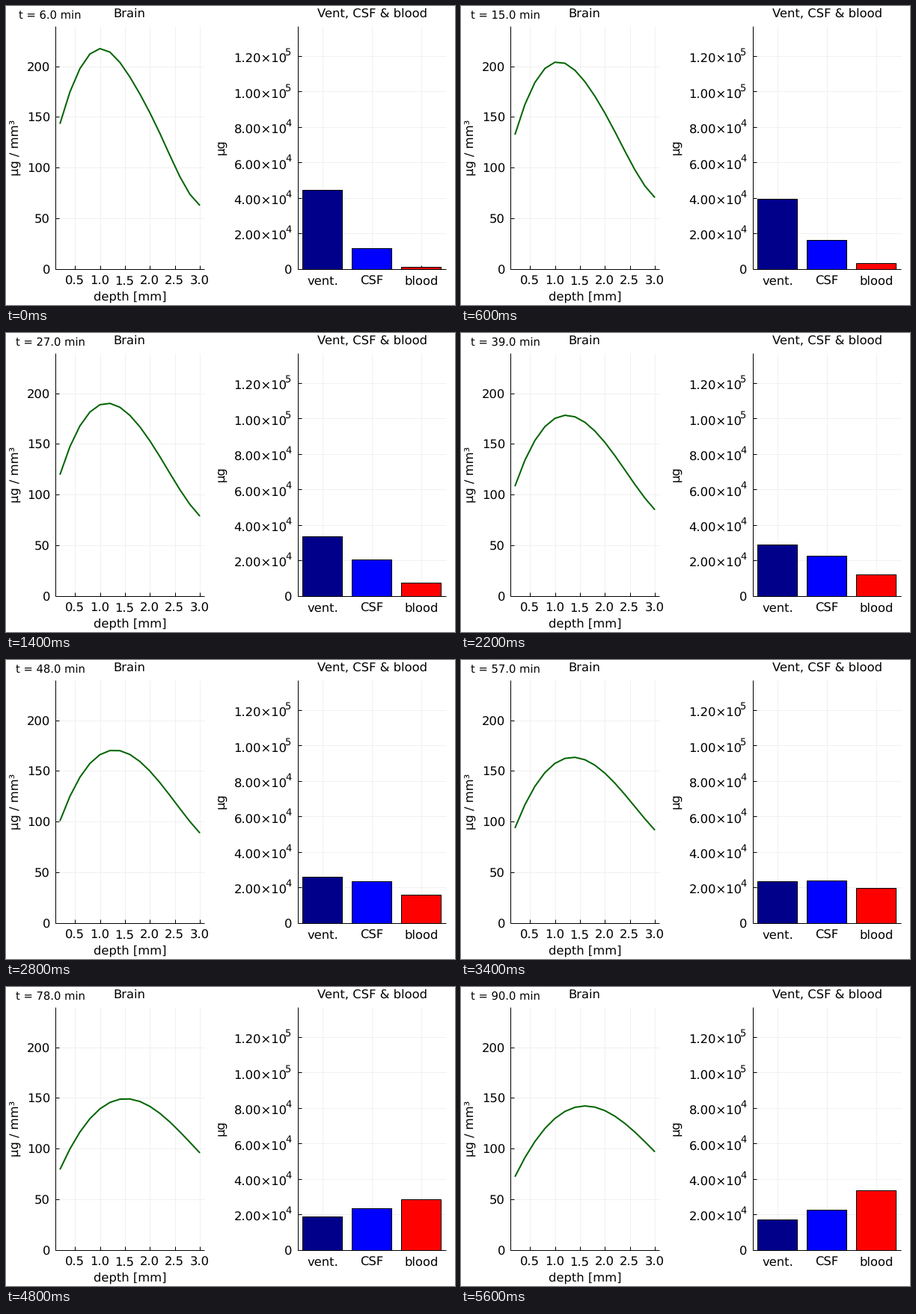
A matplotlib script that plays this animation: 600 by 400 pixels, repeating every 5.8 s.

```python
import numpy as np
import matplotlib.pyplot as plt
from matplotlib.animation import FuncAnimation
from matplotlib.patches import Rectangle

plt.rcParams.update({"font.family": "DejaVu Sans", "text.hinting": "none"})

W, H, DPI = 600, 400, 100
PX = 72 / DPI
FRAMES, INTERVAL = 29, 200
TOP, BASE = 27, 351.6
FONT, SMALL, SUP = 16.4, 14.7, 13

DEPTH = np.linspace(0.2, 3.0, 15)
BARS = [("vent.", "#00008b"), ("CSF", "#0000ff"), ("blood", "#ff0000")]


def brain(d, t):
    """Concentration at depth d: a slow even mode, an odd one, a brief ripple."""
    v = d - 1.6
    q = np.exp(-0.015 * t)
    even = (193.8 - 0.575 * t) * np.cos((0.715 - 0.00053 * t) * v)
    odd = (31.7 - 121.1 * q) * v + (32.5 * q - 4.1) * v ** 3
    ripple = 3 * np.exp(-t / 10) * (0.4 - np.cos(5 * v))
    return even + odd + ripple


def amounts(t):
    """Thousands of µg in ventricle, CSF and blood."""
    return (
        8.55 + 39.75 * np.exp(-0.0172 * t),
        34.7 - 0.12 * t - 27 * np.exp(-0.033 * t),
        0.425 * t - 4.65 + 4.9 * np.exp(-0.075 * t),
    )


def depth_x(d):
    return 92.1 + (d - 0.5) * 66.8


def conc_y(c):
    return BASE - c * 1.355


def mass_y(m):
    return BASE - m * 2.372


def bar_x(i):
    return 422.7 + 66 * i


fig = plt.figure(figsize=(W / DPI, H / DPI), dpi=DPI, facecolor="white")
ax = fig.add_axes([0, 0, 1, 1])
ax.set(xlim=(0, W), ylim=(H, 0))
ax.axis("off")


def seg(x0, y0, x1, y1, color="black", z=2):
    ax.plot([x0, x1], [y0, y1], color=color, lw=PX, zorder=z,
            solid_capstyle="butt")


def label(x, y, s, ha="center", size=FONT, **kw):
    return ax.text(x, y, s, fontsize=size * PX, ha=ha, va="baseline", **kw)


def vlabel(x, y, s):
    label(x, y, s, rotation=90, rotation_mode="anchor")


def panel(left, right, xs, ys):
    for x in xs:
        seg(x, TOP, x, BASE, "#f0f0f0", 1)
        seg(x, BASE, x, BASE - 5)
    for y in ys:
        seg(left, y, right, y, "#f0f0f0", 1)
        seg(left, y, left + 5, y)
    seg(left, TOP, left, BASE)
    seg(left, BASE, right, BASE)


# Brain panel
depth_ticks = np.arange(0.5, 3.1, 0.5)
conc_ticks = range(0, 201, 50)
panel(66, 265, depth_x(depth_ticks), [conc_y(c) for c in conc_ticks])
for d in depth_ticks:
    label(depth_x(d) - 0.5, 372.7, f"{d:.1f}")
for c in conc_ticks:
    label(59, conc_y(c) + 6.8, str(c), "right")
label(164.8, 14.7, "Brain")
label(165.5, 393.7, "depth [mm]")
vlabel(18, 189.5, "µg / mm³")

# Compartment panel
mass_ticks = range(0, 121, 20)
panel(390, 588, [bar_x(i) for i in range(3)], [mass_y(m) for m in mass_ticks])
label(382, BASE + 6.8, "0", "right")
for m in mass_ticks[1:]:
    power = 5 if m >= 100 else 4
    y = mass_y(m)
    label(304.4, y + 9, f"{m * 1000 / 10 ** power:.2f}×10", "left")
    label(373.4, y - 1, str(power), "left", SUP)
label(489.5, 14.7, "Vent, CSF & blood")
vlabel(292, 188.5, "µg")

bars = []
for i, (name, color) in enumerate(BARS):
    label(bar_x(i) + 0.5, 372.7, name)
    bars.append(ax.add_patch(Rectangle(
        (bar_x(i) - 26.3, BASE), 52.6, 0, fc=color, ec="black", lw=PX, zorder=3)))

curve, = ax.plot([], [], color="#006400", lw=2 * PX, zorder=3,
                 solid_capstyle="butt", solid_joinstyle="round")
clock = label(59.2, 17, "", size=SMALL)


def draw(frame):
    t = 6 + 3 * frame
    curve.set_data(depth_x(DEPTH), conc_y(brain(DEPTH, t)))
    for bar, mass in zip(bars, amounts(t)):
        bar.set_height(mass_y(mass) - BASE)
    clock.set_text(f"t = {t:.1f} min")
    return [curve, clock, *bars]


anim = FuncAnimation(fig, draw, frames=FRAMES, init_func=lambda: draw(0),
                     interval=INTERVAL, repeat=True, repeat_delay=0)
plt.show()
```
